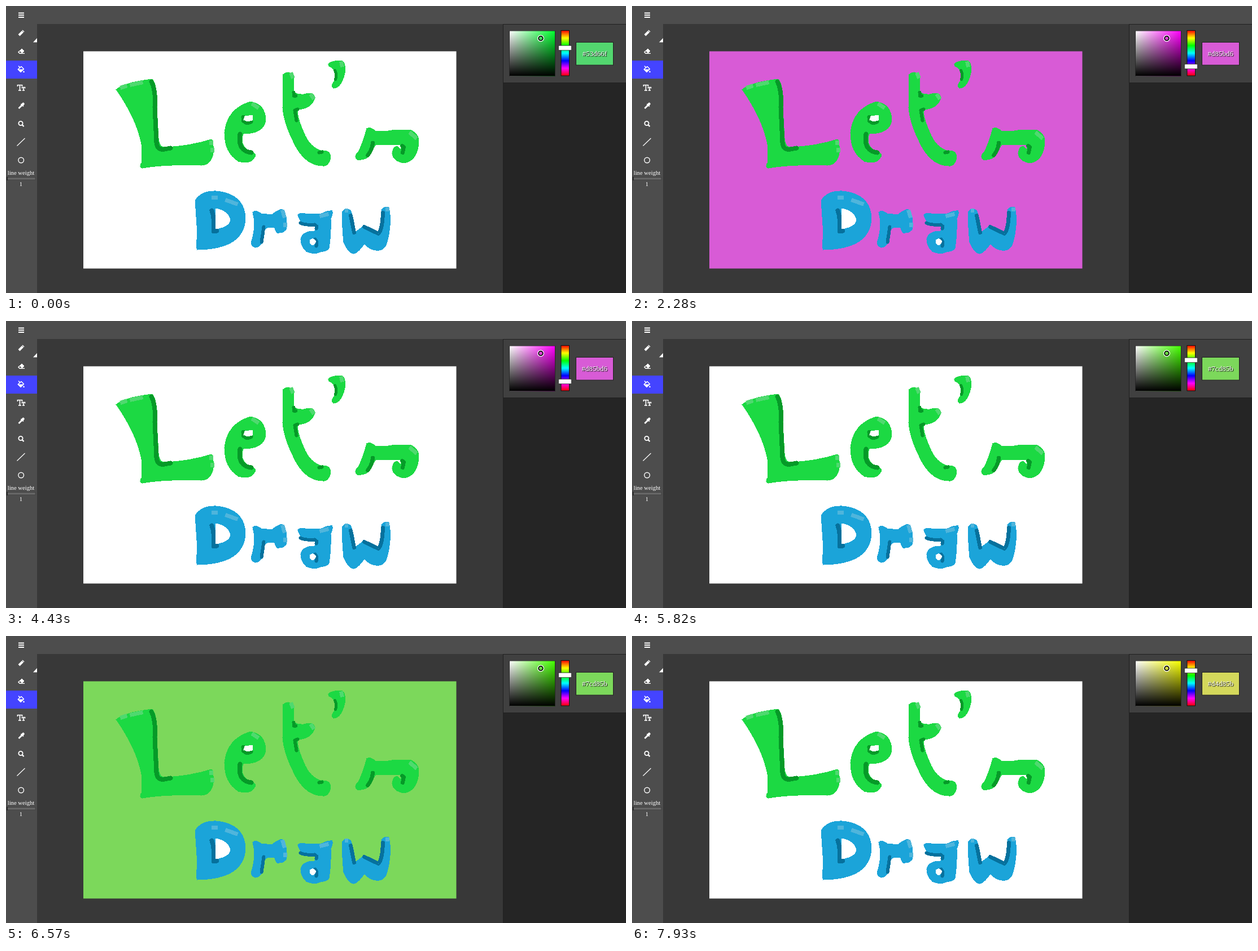
These frames come from a looping animation (1098 by 510 pixels, 8000 ms). An HTML page:

```html
<!DOCTYPE html>
<html lang="en">
<head>
<meta charset="utf-8">
<title>Let's Draw</title>
<style>
html, body { margin: 0; width: 100%; height: 100%; overflow: hidden; background: #383838; }
svg { display: block; }
text { font-family: "Liberation Serif", serif; fill: #fff; text-anchor: middle; }
#hex { text-shadow: 1px 1px 1px #000; }
</style>
</head>
<body>
<svg width="1098" height="510" viewBox="0 0 1098 510">
  <defs>
    <linearGradient id="sat"><stop stop-color="#fff"/><stop id="pure" offset="1"/></linearGradient>
    <linearGradient id="val" x2="0" y2="1"><stop stop-color="#000" stop-opacity="0"/><stop offset="1"/></linearGradient>
    <linearGradient id="spectrum" x2="0" y2="1"></linearGradient>
  </defs>

  <rect width="1098" height="510" fill="#383838"/>
  <path d="M0 0H1098V32H55V510H0Z" fill="#4d4d4d"/>
  <rect x="880" y="32" width="218" height="478" fill="#202020"/>
  <rect x="881" y="33" width="217" height="103" fill="#404040"/>
  <rect x="881" y="137" width="217" height="373" fill="#252525"/>

  <rect id="paper" x="137" y="80.500" width="660.500" height="386"/>
  <g id="art" transform="translate(.5 -.5)" shape-rendering="crispEdges" stroke-linejoin="round"></g>

  <rect y="97" width="55" height="32" fill="#44f"/>
  <path d="M48 64.500L55 57V64.500Z" fill="#fff"/>
  <g fill="none" stroke="#fff">
    <path d="M22 12.500h10M22 16.200h10M22 19.900h10" stroke-width="2"/>
    <path d="M23 52L29.500 45.500" stroke-width="4"/>
    <path d="M30 45L31 44" stroke-width="4.500"/>
    <path d="M25 84.300h8" stroke-width="1.400"/>
    <path d="M24.500 79.500L28.500 83.500 32 80 28 76Z" fill="#fff" stroke-linejoin="round"/>
    <path d="M24.500 79.500L22 82 24.200 84.200H27.800" stroke-width="1.500"/>
    <path d="M21.300 112.500L27 107.500 31.500 112 26 117.300Z" stroke-width="1.500" stroke-linejoin="round"/>
    <path d="M21.500 113H31L26 117.500ZM31.500 115.500l1 2h-2Z" fill="#fff"/>
    <path d="M22 106.500l3.500 3.500" stroke-width="1.500"/>
    <path d="M20.500 143V140.500H28.500V143M24.500 140.500V150M22 149.800h5M28.500 146.500V144.500H33.500V146.500M31 144.500V150M29 149.800h4" stroke-width="1.700"/>
    <path d="M22.500 182L28 176.500" stroke-width="2.800"/>
    <path d="M26.500 174L31 178.500" stroke-width="1.600"/>
    <path d="M28.500 176L30.500 174" stroke-width="4.500" stroke-linecap="round"/>
    <circle cx="26" cy="208.500" r="3.600" stroke-width="1.900"/>
    <path d="M28.700 211.200L31.600 214.100" stroke-width="2.200"/>
    <path d="M19.500 248.500L33.500 235" stroke-width="1.200"/>
    <circle cx="26.700" cy="274" r="4.800" stroke-width="1.400"/>
  </g>
  <text x="26.500" y="300" font-size="10.670">line weight</text>
  <rect x="2" y="304.500" width="50" height="4.500" fill="#666" stroke="#3b3b3b" stroke-width=".7"/>
  <rect x="1.500" y="303.500" width="1.500" height="6.500" fill="#222"/>
  <text x="26.500" y="320" font-size="10.670">1</text>

  <rect x="891.500" y="44" width="81" height="81" fill="#111"/>
  <rect x="892" y="44.500" width="80" height="80" fill="url(#sat)"/>
  <rect x="892" y="44.500" width="80" height="80" fill="url(#val)"/>
  <g fill="none">
    <circle cx="947" cy="57.500" r="5.200" stroke="#fff" stroke-width="1.500"/>
    <circle cx="947" cy="57.500" r="3.800" stroke="#000" stroke-width="1.700"/>
  </g>
  <rect x="983" y="43.500" width="14.500" height="80.500" fill="url(#spectrum)" stroke="#111"/>
  <rect id="knob" x="978.500" width="23" height="8.500" rx="1.500" fill="#fff" stroke="#222" stroke-width=".8"/>
  <rect id="swatch" x="1009.500" y="64.500" width="66" height="40.500" stroke="#222"/>
  <text id="hex" x="1042.300" y="88.500" font-size="13"></text>
</svg>
<script>
const $ = id => document.getElementById(id);

function add(parent, tag, attrs) {
  const el = document.createElementNS('http://www.w3.org/2000/svg', tag);
  for (const k in attrs) el.setAttribute(k, attrs[k]);
  parent.appendChild(el);
}

for (let i = 0; i <= 6; i++)
  add($('spectrum'), 'stop', { offset: i / 6, 'stop-color': `hsl(${i * 60},100%,50%)` });

const GREEN = { body: '#1cd943', shade: '#069a28', shine: '#4fd96f' };
const BLUE = { body: '#1ba4d9', shade: '#06719d', shine: '#4fb5dc' };

// A letter: filled outline, brushed shadow, optional white hole, short highlights
function letter(ink, width, { body, shade, hole, shine }) {
  const brush = (d, stroke, w, cap) => add($('art'), 'path',
    { d, fill: 'none', stroke, 'stroke-width': w, 'stroke-linecap': cap });
  add($('art'), 'path', { d: body, fill: ink.body });
  brush(shade, ink.shade, width, 'round');
  if (hole) add($('art'), 'path', { d: hole, fill: '#fff' });
  brush(shine, ink.shine, 7, 'butt');
}

letter(GREEN, 8, { // L
  body: 'M194 149Q200 143 223 136Q240 132 257 130Q264 131 267 158V182L270 235Q271 252 282 251Q325 249 363 237Q368 238 367 262Q363 284 345 284Q280 282 241 289Q234 287 239 279V246Q230 200 194 149Z',
  shade: 'M257 135Q265 150 263 180L266 243Q267 257 280 255L291 253',
  shine: 'M202 146L214 142M219 141L242 136M363 239V247M365 252V260'
});
letter(GREEN, 8, { // e
  body: 'M432 170Q459 174 460 203Q457 228 420 228Q412 252 438 261Q447 266 433 277Q424 281 411 277Q386 262 386 226Q390 183 432 170Z',
  shade: 'M420 198V204L426 208L433 206M414 228Q409 258 434 261',
  hole: 'M422 196L437 194L436 204L426 206L420 203Z',
  shine: 'M435 174L447 182'
});
letter(GREEN, 6, { // t
  body: 'M490 122Q500 113 509 124V150Q511 158 527 157Q545 151 547 164Q541 183 517 185Q514 196 530 231Q540 252 558 257Q575 256 575 270Q571 286 562 285Q532 286 512 250Q491 210 489 181Z',
  shade: 'M509 154V160H513M516 184L511 186L514 204M554 261L559 260',
  shine: 'M504 119L508 129M539 157L545 166'
});
letter(GREEN, 5, { // apostrophe
  body: 'M570 104Q574 97 594 97Q602 100 600 120Q594 146 580 147Q573 143 579 136Q585 128 580 115Q577 110 571 108Z',
  shade: 'M582 115Q586 122 583 131',
  shine: 'M593 99L595 109'
});
letter(GREEN, 7, { // s
  body: 'M638 218Q644 214 654 222Q670 224 682 221L716 220Q731 228 731 240Q730 275 705 280Q684 277 683 262Q684 251 692 249L698 254V247H655Q649 255 645 264Q638 276 622 274Q613 269 624 258Q631 243 638 218Z',
  shade: 'M649 244Q648 256 640 266M701 249L704 251L702 261',
  shine: 'M714 225L727 236'
});
letter(BLUE, 8, { // D
  body: 'M334 346Q345 328 372 329Q423 334 424 379Q421 433 338 434Q335 432 338 405Z',
  shade: 'M364 364Q369 378 367 401L373 400',
  hole: 'M370 360Q392 363 397 380Q396 393 371 397Z',
  shine: 'M363 341H374M388 345L410 353'
});
letter(BLUE, 6, { // r
  body: 'M436 367Q440 361 452 369L470 371Q477 365 487 361Q498 364 497 395Q494 405 480 404Q476 401 475 395Q463 392 458 398Q456 430 441 430Q430 427 435 415Q442 390 436 367Z',
  shade: 'M456 393L452 420',
  shine: 'M489 363L493 377M494 385V393'
});
letter(BLUE, 6, { // a
  body: 'M516 372Q518 367 530 369H558Q570 363 577 364Q580 368 575 379Q576 405 572 431Q567 438 558 437Q547 444 531 437Q521 428 521 415Q524 400 545 400L552 396L546 393L528 391Q519 384 516 372Z',
  shade: 'M521 386Q527 390 546 389L550 392L549 396M547 415Q552 420 549 427',
  hole: 'M538 416Q543 411 548 417Q549 424 542 426Q536 423 538 416Z',
  shine: 'M555 374L571 370'
});
letter(BLUE, 7, { // w
  body: 'M595 366Q600 357 610 363Q617 380 618 402L634 390L658 403Q667 395 664 363Q668 355 678 358Q684 385 675 420Q670 437 655 435Q645 435 634 424Q623 440 615 441Q605 440 597 420Q594 395 595 366Z',
  shade: 'M610 373L616 403M634 393L659 405Q666 398 667 368',
  shine: 'M599 364H605M671 362H678'
});

// Steps in time: hue of the picker, fill of the paper
const hues = [[0, 131], [500, 301], [5390, 272], [5530, 214], [5680, 146], [5820, 104], [7930, 62]];
const fills = [[0, '#fff'], [2280, '#d85bd6'], [4430, '#fff'], [6570, '#7cd85b'], [7140, '#fff']];
const LOOP = 8000;
const current = (list, t) => list.filter(e => e[0] <= t).pop()[1];

// Colour at the fixed picker position: channels run from 91 to 216
function tone(hue) {
  const part = n => {
    const k = (n + hue / 60) % 6;
    return Math.round(216 - 125 * Math.max(0, Math.min(k, 4 - k, 1))).toString(16);
  };
  return '#' + part(5) + part(3) + part(1);
}

function draw(t) {
  const hue = current(hues, t);
  const color = t < 500 ? '#53d66f' : tone(hue);
  $('paper').setAttribute('fill', current(fills, t));
  $('pure').setAttribute('stop-color', `hsl(${hue},100%,50%)`);
  $('knob').setAttribute('y', Math.round(45 + hue / 360 * 69) + .2);
  $('swatch').setAttribute('fill', color);
  $('hex').textContent = color;
}

const start = performance.now();
function tick() {
  draw((performance.now() - start) % LOOP);
  requestAnimationFrame(tick);
}
draw(0);
requestAnimationFrame(tick);
</script>
</body>
</html>
```
